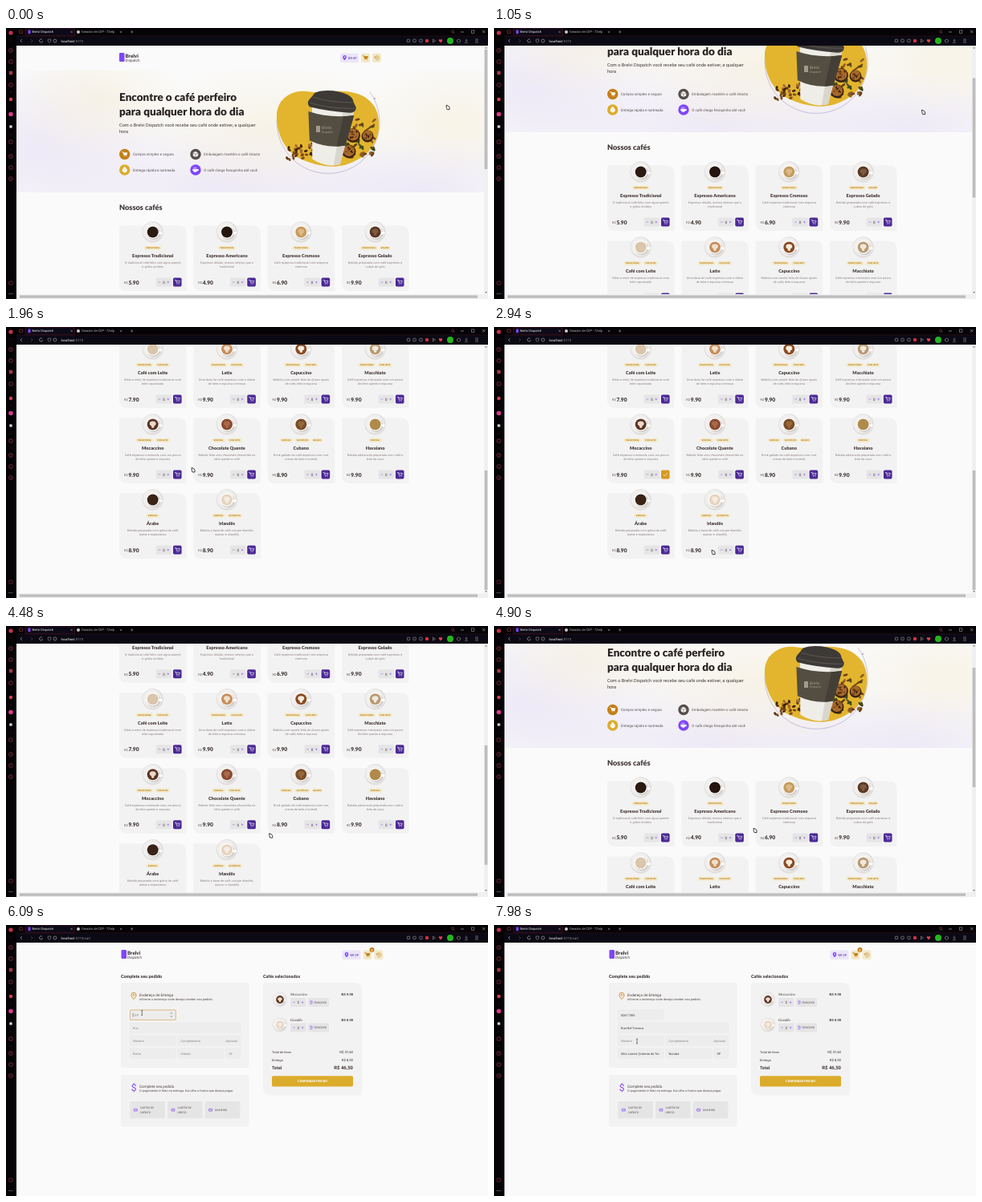
An HTML page that plays this animation: 600x338 px, repeating every 8 s.

```html
<!DOCTYPE html>
<html lang="pt-BR">
<meta charset="utf-8">
<style>
html, body { margin: 0; height: 100%; overflow: hidden; background: #050306 }
svg { display: block }
text { font-family: Roboto, sans-serif; white-space: pre; text-rendering: geometricPrecision }
.b { font-family: Lato, sans-serif; font-weight: 900 }
.m { font-weight: 700 }
.s { font-family: "Liberation Serif", serif }
.i { font-style: italic }
</style>
<body>
<script>
const INK = '#403937', TEXT = '#574f4d', GREY = '#8d8686', CARD = '#f3f2f2', BTN = '#e6e5e5',
  PURPLE = '#8047f8', DEEP = '#4b2995', GOLD = '#dbac2c', AMBER = '#c47f17', CREAM = '#f1e9c9';

const rect = (x, y, w, h, fill, r = 0, extra = '') =>
  `<rect x="${x}" y="${y}" width="${w}" height="${h}" rx="${r}" fill="${fill}" ${extra}/>`;
const oval = (x, y, rx, ry, fill, extra = '') =>
  `<ellipse cx="${x}" cy="${y}" rx="${rx}" ry="${ry}" fill="${fill}" ${extra}/>`;
const disc = (x, y, r, fill, extra) => oval(x, y, r, r, fill, extra);
const line = (d, color, w = .6, extra = '') =>
  `<path d="${d}" fill="none" stroke="${color}" stroke-width="${w}" ${extra}/>`;
const shape = (d, fill) => `<path d="${d}" fill="${fill}"/>`;
const text = (str, x, y, size, fill = TEXT, cls = '', anchor = 'start', id = '') =>
  `<text x="${x}" y="${y}" font-size="${size}" fill="${fill}" class="${cls}" text-anchor="${anchor}" id="${id}">${str}</text>`;
const at = (x, y, body, id = '') => `<g id="${id}" transform="translate(${x} ${y})">${body}</g>`;
// Panel with small top-left / bottom-right corners and large other ones
const leaf = (x, y, w, h, a = 2, b = 10) => shape(
  `M${x + a} ${y}h${w - a - b}q${b} 0 ${b} ${b}v${h - a - b}q0 ${a} ${-a} ${a}h${a + b - w}` +
  `q${-b} 0 ${-b} ${-b}v${a + b - h}q0 ${-a} ${a} ${-a}z`, CARD);

const CART = 'M-3-2.7h1.2l1 3.6h3.1l.8-2.6h-4.5M-.5 2.3h.1M2 2.3h.1', CHECK = 'M-2.2 0l1.6 1.6L2.4-1.7';
const PIN = 'M0 3C-1.4 1.4-2.3.3-2.3-.8a2.3 2.3 0 0 1 4.6 0C2.3.3 1.4 1.4 0 3z';

const saucer = (x, y, r, coffee, foam) => disc(x, y, r, '#e2e0de') + disc(x - r * .06, y - r * .06, r * .86, '#f1f0ef') +
  oval(x + r * .08, y + r * .1, r * .66, r * .64, '#cfcbc8') + rect(x + r * .4, y - r * .02, r * .5, r * .22, '#fff', 1) +
  disc(x, y, r * .62, '#fff') + disc(x, y, r * .53, coffee) +
  (foam ? oval(x, y - r * .08, r * .3, r * .22, foam) + oval(x, y + r * .1, r * .14, r * .25, foam) : '');

const counter = (x, y, value, id) => rect(x, y, 19.5, 11, BTN, 1.5) +
  line(`M${x + 3} ${y + 5.5}h2.6M${x + 13.8} ${y + 5.5}h2.6m-1.3-1.3v2.6`, PURPLE, .5) +
  text(value, x + 9.8, y + 7.3, 4.6, INK, '', 'middle', id);

function header(dx, id) {
  return at(dx, 0, rect(141, 31, 6.5, 11, PURPLE, 1) +
    text('Brelvi', 148.5, 36.8, 6.2, INK, 'b') + text('Dispatch', 148.5, 42, 4.6, INK) +
    rect(416, 31.5, 23, 11.5, '#ebe5f9', 2) + at(421.5, 37.2, shape(PIN, PURPLE) + disc(0, -.8, .8, '#fff')) +
    text('BR-SP', 426, 38.7, 3.9, DEEP) +
    rect(442, 31.5, 11, 11.5, CREAM, 2) + at(447.3, 37.3, shape(CART, AMBER) + line(CART, AMBER, .8, 'stroke-linecap="round"')) +
    rect(456, 31.5, 11, 11.5, CREAM, 2) +
    line('M459 35.2v2h2M459.2 37a2.6 2.6 0 1 1 .6 2M461.6 35.7v1.8l1.3.7', AMBER, .6) +
    `<g id="${id}">` + disc(453, 31, 3, AMBER) + text('2', 453, 32.5, 4, '#fff', 'm', 'middle') + '</g>');
}

let seed = 7;
const random = () => (seed = seed * 16807 % 2147483647) / 2147483647;
const scatter = (n, x, y, w, h, colors, rx, ry) => Array.from({ length: n }, (_, i) => {
  const px = x + random() * w, py = y + random() * h;
  return oval(px, py, rx, ry, colors[i % colors.length], `transform="rotate(${random() * 180} ${px} ${py})"`);
}).join('');

function heroCup() {
  const browns = ['#5a3214', '#7a4a20', '#3c200d', '#a36a2f'];
  let s = line('M453 80A64 64 0 1 1 342 93', '#7f78b0', .4) + disc(343, 92, .7, '#5b4a9c') + disc(459, 88, .7, '#5b4a9c');
  s += shape('M337 108C338 88 356 77 374 79C392 82 402 78 420 79C446 80 463 94 464 116C466 142 452 158 434 166' +
    'C412 178 386 172 366 163C348 154 336 132 337 108z', '#e3b52e');
  s += scatter(30, 350, 144, 34, 20, browns, 2.3, 1.5);
  s += scatter(46, 416, 114, 44, 48, ['#52622a', '#6b3d17', '#8d5d24', '#3f4a20'], 3.2, 1.4);
  for (const [x, y, r] of [[432, 134, 9], [450, 135, 7.5], [427, 154, 8.5]])
    s += disc(x, y, r, '#3a2413') + disc(x, y - 1, r * .82, '#a9692a') + scatter(12, x - r * .5, y - r * .6, r, r, browns, 1.5, 1);
  s += line('M446 129L459 120', '#6d431d', 1.8);
  return s + '<g transform="rotate(4 403 125)">' +
    shape('M379 98L432 101L419 169Q402 175 384 165z', '#efede7') + shape('M418 101L432 101L419 169L411 171z', '#d9d6cd') +
    shape('M375 106Q403 113 432 107L424 145Q402 151 379 142z', '#544e42') + shape('M419 109L432 107L424 145L413 147z', '#443f36') +
    shape('M379 86Q381 78 404 78Q429 80 430 90L434 97Q434 104 426 104Q398 104 376 100Q372 96 375 91z', '#3d3936') +
    line('M376 95Q402 101 433 98M380 88Q404 93 429 91', '#5b5651', 1) + '</g>' +
    rect(386, 122, 5, 8, '#a49a8b', .5) + text('Brelvi', 393, 126, 5, '#a49a8b') + text('Dispatch', 393, 130.5, 3.6, '#a49a8b');
}

function hero() {
  const blob = (x, y, rx, ry, c) => oval(x, y, rx, ry, `url(#${c})`);
  const feature = (x, y, color, label, icon, detail = '') => disc(x, y, 6.7, color) +
    at(x, y, shape(icon, '#fff') + line(icon, '#fff', .8, 'stroke-linecap="round"') + line(detail, color, .6)) +
    text(label, x + 10.2, y + 1.6, 4.5);
  return '<svg x="13" y="53" width="582" height="152" viewBox="13 53 582 152">' +
    blob(40, 150, 170, 110, 'lilac') + blob(115, 90, 110, 80, 'honey') + blob(270, 200, 280, 90, 'lilac') +
    blob(560, 120, 130, 85, 'honey') + blob(520, 205, 190, 75, 'lilac') + blob(330, 125, 170, 85, 'honey') + '</svg>' +
    text('Encontre o café perfeiro', 141, 91.3, 13.5, '#272221', 'b') +
    text('para qualquer hora do dia', 141, 109, 13.6, '#272221', 'b') +
    text('Com o Brelvi Dispatch você recebe seu café onde estiver, a qualquer', 141, 123.4, 5.64, INK) +
    text('hora', 141, 130.6, 5.64, INK) +
    feature(147.7, 157.5, AMBER, 'Compra simples e segura', CART) +
    feature(147.7, 177, GOLD, 'Entrega rápida e rastreada', 'M0-2.4a2.7 2.7 0 1 0 .1 0zM-.8-3.4h1.6', 'M0 .3L1.2-1') +
    feature(236, 157.5, TEXT, 'Embalagem mantém o café intacto', 'M0-3L2.8-1.5V1.7L0 3L-2.8 1.7V-1.5z', 'M-3-1.5L0 0L3-1.5M0 0V3') +
    feature(236, 177, PURPLE, 'O café chega fresquinho até você', 'M-3-.8h5v2q-2.5 2.8-5 0zM2-.5h1.3v1.3H2M-1.8-3v.8M.2-3v.8') +
    heroCup();
}

const T = 'TRADICIONAL', E = 'ESPECIAL', L = 'COM LEITE', A = 'ALCOÓLICO', G = 'GELADO';
const MIXED = 'Café expresso misturado com um pouco|de leite quente e espuma';
const coffees = [
  ['Expresso Tradicional', [T], 'O tradicional café feito com água quente|e grãos moídos', '5.90', '#2b1a10'],
  ['Expresso Americano', [T], 'Expresso diluído, menos intenso que o|tradicional', '4.90', '#24150f'],
  ['Expresso Cremoso', [T], 'Café expresso tradicional com espuma|cremosa', '6.90', '#c69a5d', '#dcb987'],
  ['Expresso Gelado', [T, G], 'Bebida preparada com café expresso e|cubos de gelo', '9.90', '#5b3a24', '#7d5a40'],
  ['Café com Leite', [T, L], 'Meio a meio de expresso tradicional com|leite vaporizado', '7.90', '#d9c6ab'],
  ['Latte', [T, L], 'Uma dose de café expresso com o dobro|de leite e espuma cremosa', '9.90', '#c68f5f', '#f0dfca'],
  ['Capuccino', [T, L], 'Bebida com canela feita de doses iguais|de café, leite e espuma', '9.90', '#8a4a22', '#f6ebdd'],
  ['Macchiato', [T, L], MIXED, '9.90', '#b99a72', '#efe8dd'],
  ['Mocaccino', [T, L], MIXED, '9.90', '#5a3422', '#e9d9c8'],
  ['Chocolate Quente', [E, L], 'Bebida feita com chocolate dissolvido no|leite quente e café', '9.90', '#8a4a30', '#a86a4c'],
  ['Cubano', [E, A, G], 'Drink gelado de café expresso com rum,|creme de leite e hortelã', '8.90', '#7a4c26', '#94683c'],
  ['Havaiano', [E], 'Bebida adocicada preparada com café e|leite de coco', '9.90', '#b08a4a'],
  ['Árabe', [E], 'Bebida preparada com grãos de café|árabe e especiarias', '8.90', '#3a2416'],
  ['Irlandês', [E, A], 'Bebida a base de café, uísque irlandês,|açúcar e chantilly', '8.90', '#e6d3bd', '#f4ece2'],
];

function card([name, tags, about, price, ...colors], i) {
  const widths = tags.map(t => t.length * 1.7 + 2.6);
  let x = 41.7 - (widths.reduce((a, b) => a + b) + 3 * (tags.length - 1)) / 2;
  let s = leaf(0, 0, 83.5, 81.5) + saucer(41.7, 8, 13.2, ...colors);
  tags.forEach((tag, k) => {
    s += rect(x, 25.2, widths[k], 5, CREAM, 2.5) + text(tag, x + widths[k] / 2, 28.7, 2.5, AMBER, 'b', 'middle');
    x += widths[k] + 3;
  });
  s += text(name, 41.7, 39.6, 5.6, INK, 'b', 'middle');
  about.split('|').forEach((row, k) => s += text(row, 41.7, 47.6 + k * 5.1, 3.88, GREY, '', 'middle'));
  s += text('R$', 6, 72.7, 3.9) + text(price, 11.4, 73, 6.7, INK, 'b') + counter(45.7, 65, 0, 'qty' + i);
  s += rect(67, 65, 10.6, 11, DEEP, 1.7, `id="btn${i}"`) +
    at(72.3, 70.6, line(CART, '#fff', .6, `stroke-linecap="round" id="icon${i}"`));
  return at(+(141 + i % 4 * 92.3).toFixed(1), 246.5 + (i >> 2) * 94, s);
}

const home = rect(13, 0, 587, 660, '#fafafa') + header(0, 'homeBadge') + hero() +
  text('Nossos cafés', 141, 227, 9.2, INK, 'b') + coffees.map(card).join('');

const bars = rect(595, 22, 5, 316, '#f0f0f0') + rect(13, 332, 587, 6, '#f0f0f0') +
  rect(17, 333.4, 570, 3.4, '#bdbdbd') + rect(595.7, 27, 3.6, 149, '#bdbdbd', 0, 'id="thumb"') +
  shape('M597.6 23.5l1.5 2h-3zM597.6 331l1.5-2h-3z', '#888');

function cartPage() {
  const field = (x, y, w, id, label) => rect(x, y, w, 12.3, '#ededed', 1.2, `id="${id}Box" stroke="${BTN}" stroke-width=".5"`) +
    text(label, x + 3.5, y + 7.6, 3.9, GREY, '', 'start', id);
  const pay = (x, label) => rect(x, 220, 43.7, 21.3, BTN, 1.7) +
    rect(x + 5, 229.2, 4, 3, 'none', .4, `stroke="${PURPLE}" stroke-width=".6"`) + line(`M${x + 5} 230.6h4`, PURPLE, .5) +
    label.split('|').map((row, k, all) => text(row, x + 12.5, 231.8 + (k - (all.length - 1) / 2) * 5.6, 3.3)).join('');
  const item = (y, i) => saucer(341, y + 93, 9.2, ...coffees[i].slice(4)) +
    text(coffees[i][0], 354, y + 88, 4.7, INK, 's') + text('R$ ' + coffees[i][3], 432, y + 88, 4.6, INK, 's m', 'end') +
    counter(354, y + 91, 2, 'item' + i) + rect(376, y + 91, 26, 11, BTN, 1.5) +
    line(`M378.5 ${y + 95}h3M379 ${y + 95}v3.3h2v-3.3M379.6 ${y + 94.3}h.8`, PURPLE, .5) + text('REMOVER', 383.5, y + 97.8, 3.4);
  const total = (label, value, y, size, cls) => text(label, 331, y, size, INK, cls) + text(value, 432, y, size * 1.08, INK, cls, 'end');
  return rect(13, 22, 587, 316, '#fafafa') + header(2.5, 'cartBadge') +
    text('Complete seu pedido', 143, 66, 5.4, INK, 'b') + text('Cafés selecionados', 320, 66, 5.4, INK, 'b') +
    rect(143, 72, 159.5, 106, CARD, 2) +
    at(159, 88.5, `<g transform="scale(1.35)">${line(PIN, AMBER, .6)}${disc(0, -.8, .8, 'none', `stroke="${AMBER}" stroke-width=".5"`)}</g>`) +
    text('Endereço de Entrega', 166, 88.5, 4.6, INK) +
    text('Informe o endereço onde deseja receber seu pedido.', 166, 94, 3.95) +
    field(154.5, 106, 56.8, 'cep', 'CEP') + field(154.5, 122, 137, 'street', 'Rua') +
    field(154.5, 138, 56.8, 'number', 'Número') + field(214, 138, 77.5, 'extra', 'Complemento') +
    text('Opcional', 288, 145.6, 3.9, GREY, 'i', 'end') +
    field(154.5, 154, 56.8, 'area', 'Bairro') + field(214, 154, 57, 'city', 'Cidade') + field(274, 154, 17.5, 'state', 'UF') +
    line('M204.5 110.8l1.3-1.6 1.3 1.6M204.5 113.2l1.3 1.6 1.3-1.6', '#666', .6, 'id="spinner"') +
    line('M0 109.6v5', INK, .4, 'id="caret"') +
    rect(143, 187, 159.5, 64.5, CARD, 2) + text('$', 159, 207, 12, PURPLE, '', 'middle') +
    text('Complete seu pedido', 166, 203, 4.6, INK) +
    text('O pagamento é feito na entrega. Escolha a forma que deseja pagar.', 166, 208.4, 3.95) +
    pay(154.3, 'CARTÃO DE|CRÉDITO') + pay(201, 'CARTÃO DE|DÉBITO') + pay(247.6, 'DINHEIRO') +
    leaf(320, 72, 123, 140.5) + item(0, 8) + item(31.5, 13) +
    total('Total de itens', 'R$ 37,60', 160, 4) + total('Entrega', 'R$ 8,90', 169.5, 4) + total('Total', 'R$ 46,50', 179.6, 5.5, 'm') +
    rect(331, 188.3, 101, 13.2, GOLD, 1.7) + text('CONFIRMAR PEDIDO', 381.5, 196.3, 3.9, '#fff', 'm', 'middle');
}

function browser() {
  const dim = '#a23845', pale = '#b9b5bd';
  let s = rect(0, 0, 600, 22, '#050306') + rect(0, 0, 13, 338, '#050306') + rect(13, 10, 587, 12, '#0b0a14') +
    line('M13 9.8h587', '#3a0f1b', .5) + rect(24, .3, 61.5, 9.5, '#0d0a18', 1, 'stroke="#6a1626" stroke-width=".5"') +
    rect(27.5, 2.6, 3, 4.6, PURPLE) + disc(90, 5, 2, '#c9c9cf') +
    text('Brelvi Dispatch', 32.5, 6.4, 4, '#eee') + text('Gerador de CEP - 7Zelp', 94, 6.4, 4, '#b5b1ba') +
    line('M80.5 3.8l2.2 2.2m0-2.2l-2.2 2.2M142 3.8l2.2 2.2m0-2.2l-2.2 2.2M155 4.9h3.4M156.7 3.2v3.4', pale, .5) +
    rect(16.5, 3, 4, 3.5, 'none', .5, `stroke="${dim}" stroke-width=".6"`) +
    line('M20 14l-2 2 2 2', pale) + line('M31 14l2 2-2 2', '#55505c') + line('M45 14.5a2 2 0 1 0 .6 1.5', pale) +
    line('M52 14.5l2-.7 2 .7q0 3-2 4-2-1-2-4z', pale, .5) + disc(61, 16, 2, 'none', `stroke="${pale}" stroke-width=".6"`) +
    text('localhost<tspan fill="#99949e">:5173<tspan id="path">/cart</tspan></tspan>', 68.5, 17.6, 4.2, '#fff') +
    line('M558 6.5l-1.2-1.2M566 5h4M593 3l3.4 3.4m0-3.4L593 6.4', pale) + disc(556, 4.4, 1.5, 'none', `stroke="${dim}" stroke-width=".6"`) +
    rect(579.5, 3, 3.4, 3.4, 'none', 0, `stroke="${pale}" stroke-width=".5"`);
  for (const x of [501, 508.5, 516.5]) s += rect(x - 1.7, 14.2, 3.4, 3.4, 'none', .5, `stroke="${pale}" stroke-width=".5"`);
  s += disc(524, 16, 2.2, '#d8333d') + line('M531.5 14l3 2-3 2z', pale, .5) +
    shape('M541 18.4l-2.2-2.3q-.5-2 1.2-2 .8 0 1 .8.2-.8 1-.8 1.7 0 1.2 2z', '#e04050') + disc(553, 16, 4, '#25b51f') +
    line('M561.5 15l2-1 2 1v2.2l-2 1-2-1zM573 13.5v3m-1.4-1.2l1.4 1.4 1.4-1.4M571 18.2h4M584 14h4M584 16h4M584 18h4', pale, .5);
  s += disc(6, 6, 2.6, '#c8324a');
  for (const y of [28, 42, 71, 142, 160, 174, 188]) s += y % 4 ? rect(3.9, y - 2.1, 4.2, 4.2, 'none', 1, `stroke="${dim}" stroke-width=".7"`)
    : disc(6, y, 2.4, 'none', `stroke="${dim}" stroke-width=".7"`) + line(`M6 ${y - 1.2}v1.4h1`, dim, .5);
  s += rect(3.8, 53.8, 4.4, 4.4, dim, .6) + disc(6, 89, 2.2, '#d8404c') + disc(6, 107.5, 2.8, '#d93a8c') + rect(4.4, 121.4, 3.2, 3.2, '#ddd');
  for (const y of [15, 80, 98, 133, 151]) s += line(`M4.5 ${y}h3`, '#4a1820', .5);
  return s + rect(3.8, 316, 4.4, 4, 'none', .6, `stroke="${dim}" stroke-width=".6"`) +
    [4, 6, 8].map(x => disc(x, 331.5, .5, pale)).join('');
}

const glow = (id, color, o) => `<radialGradient id="${id}"><stop stop-color="${color}" stop-opacity="${o}"/>` +
  `<stop offset="1" stop-color="${color}" stop-opacity="0"/></radialGradient>`;
document.body.innerHTML = '<svg width="600" height="338" viewBox="0 0 600 338"><defs>' +
  glow('lilac', '#e8e2f6', .7) + glow('honey', '#f5edd6', .55) + '</defs>' +
  `<g id="shop"><g id="scroller">${home}</g>${bars}</g><g id="checkout">${cartPage()}</g>` + browser() +
  '<g id="mouse"><path id="arrow" d="M-1.9-2.9L1.3-1.3Q2.3-.6 2.1 2.6H-.9Q-2 1-1.9-2.9z" fill="#fff" stroke="#111" stroke-width=".8"/>' +
  line('M-.8-3h1.6M0-3v6M-.8 3h1.6', '#222', .6, 'id="beam"') + '</g></svg>';

const $ = id => document.getElementById(id);
const set = (id, name, value) => $(id).setAttribute(name, value);
const show = (id, on) => set(id, 'display', on ? 'inline' : 'none');
const ease = p => p * p * (3 - 2 * p);

// Rows of [time, ...values]
function along(keys, t, curve = p => p) {
  const i = keys.findIndex(k => k[0] > t);
  if (i === 0) return keys[0].slice(1);
  if (i < 0) return keys[keys.length - 1].slice(1);
  const a = keys[i - 1], b = keys[i], p = curve((t - a[0]) / (b[0] - a[0]));
  return a.slice(1).map((v, k) => v + (b[k + 1] - v) * p);
}

const scrollKeys = [[890, 0], [1050, 74.5], [1470, 277.5], [1600, 321], [4350, 321], [4900, 53.3], [5080, 0]];
const mouseKeys = [[0, 550, 99], [560, 546, 100], [1050, 534.5, 105], [1470, 531.5, 114], [1600, 515, 120], [2050, 201, 185],
  [2400, 201, 185], [2520, 213, 186], [2650, 213, 186], [2940, 273, 281], [3150, 293, 280], [3520, 293, 280], [3680, 305, 280],
  [3950, 305, 281], [4400, 330, 262], [4900, 325, 255], [5080, 325, 255], [5480, 448, 38], [5640, 448, 38], [6000, 169.3, 109.5],
  [7720, 169.3, 109.5], [7960, 178, 145]];
const orders = [[8, 2170, 2330, 2590], [13, 3240, 3430, 3750]];
const CEP = '00417385';

function fill(id, value, label) {
  $(id).textContent = value || label;
  set(id, 'fill', value ? INK : GREY);
}

function render(t) {
  const [scroll] = along(scrollKeys, t), [x, y] = along(mouseKeys, t, ease), inCart = t >= 5600;
  set('scroller', 'transform', `translate(0 ${-scroll})`);
  set('thumb', 'y', 27 + scroll * .4735);
  set('mouse', 'transform', `translate(${x} ${y})`);
  show('shop', !inCart);
  show('checkout', inCart);
  show('path', inCart);
  show('homeBadge', t > 2590);
  for (const [i, first, second, add] of orders) {
    const added = t >= add && t < add + 1000;
    $('qty' + i).textContent = t >= add ? 0 : (t >= first) + (t >= second);
    set('btn' + i, 'fill', added ? '#d59a22' : DEEP);
    set('icon' + i, 'd', added ? CHECK : CART);
  }
  const focused = t >= 6020 && t < 7450, filled = t >= 7450;
  const typed = CEP.slice(0, Math.max(0, Math.floor((t - 6340) / 120)));
  fill('cep', typed, 'CEP');
  fill('street', filled && 'Rua Nel Torvaca', 'Rua');
  fill('area', filled && 'Sítio Lomirá (Valente de Tor', 'Bairro');
  fill('city', filled && 'Norubá', 'Cidade');
  fill('state', filled && 'SP', 'UF');
  set('cepBox', 'stroke', focused ? AMBER : BTN);
  show('spinner', focused);
  show('caret', focused);
  set('caret', 'transform', `translate(${158 + typed.length * 2.19} 0)`);
  show('beam', t >= 5970);
  show('arrow', t < 5970);
}

(function tick() {
  render(performance.now() % 8000);
  requestAnimationFrame(tick);
})();
</script>
</body>
</html>
```
